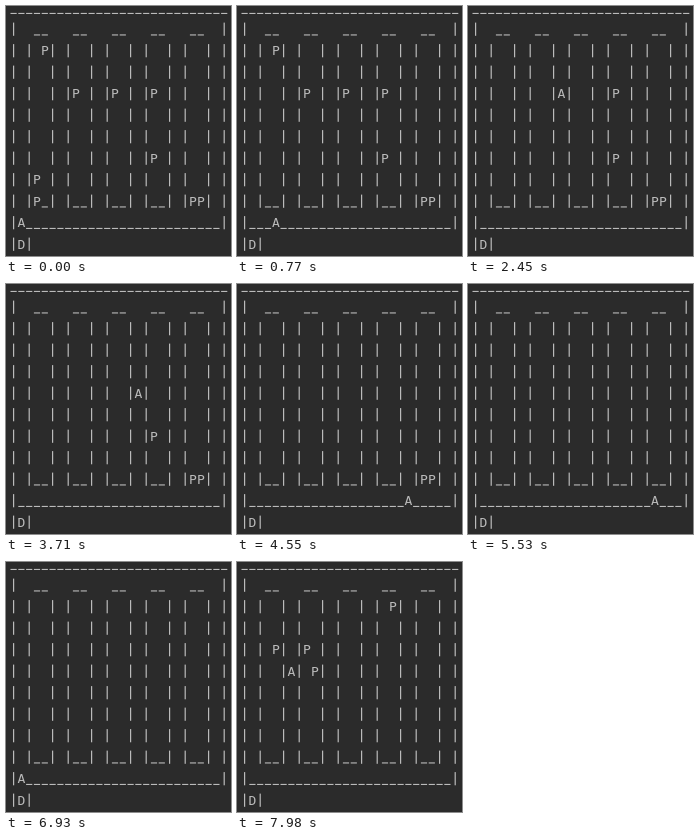
Write an HTML page with a canvas that moves like this. It is 225 by 250 pixels and loops after 8000 ms.

```html
<!DOCTYPE html>
<html lang="en">
<head>
<meta charset="utf-8">
<title>Warehouse picker</title>
<style>
  html, body { margin: 0; width: 100%; height: 100%; overflow: hidden; background: #2b2b2b; }
  canvas { display: block; width: 225px; height: 250px; }
</style>
</head>
<body>
<canvas id="stage"></canvas>
<script>
const LOOP = 8000, TICK = 70, SLACK = 5;
const REFRESH = 1.625;          // ticks between screen updates
const STEPS = 1.1 * REFRESH;    // route steps per screen update
const COL = 7.8, ROW = 21.5, LEFT = 7.6, BASE = 6.4;
const INK = '#bbbbbb', PAPER = '#2b2b2b';

// Warehouse floor: five racks between six aisles
const aisle = '| ' + '|  | '.repeat(5) + '|';
const floor = [
  '_'.repeat(28),
  '|  ' + '__   '.repeat(4) + '__  |',
  ...Array(7).fill(aisle),
  '| ' + '|__| '.repeat(5) + '|',
  '|' + '_'.repeat(26) + '|',
  '|D|'
];

// Parcels as [column, row]
const firstOrder = [[4, 2], [8, 4], [13, 4], [18, 4], [18, 7], [3, 8], [3, 9], [23, 9], [24, 9]];
const nextOrder = [[19, 2], [4, 4], [8, 4], [9, 5], [8, 7]];

// U, D, L, R move; . waits; * picks beside the aisle, then waits; N brings a new order
const route = (
  'U*U*DDRRRRRUUU UUU*UU* U.RRR.RR ' +
  'DDD* UUU.RR.RRR.D D.D*.D. DD*DDDRRR ' +
  'RRU*DRRRRRU*D' + 'L'.repeat(25) +
  '..N .RRRRRU UU.*UU'
).replaceAll(' ', '').replaceAll('*', '*.');
const dirs = { U: [0, -1], D: [0, 1], L: [-1, 0], R: [1, 0] };

const states = [{ x: 1, y: 10, parcels: firstOrder }];
for (const move of route) {
  let { x, y, parcels } = states.at(-1);
  const [dx, dy] = dirs[move] || [0, 0];
  if (move === '*') parcels = parcels.filter(([px, py]) => py !== y || Math.abs(px - x) !== 2);
  if (move === 'N') parcels = nextOrder;
  states.push({ x: x + dx, y: y + dy, parcels });
}

function stateAt(ms) {
  const tick = Math.floor(ms % LOOP / TICK);
  const update = Math.ceil((tick - 0.2) / REFRESH) - 1;
  const step = Math.floor(update * STEPS + 0.87);
  return states[Math.min(Math.max(step, 0), states.length - 1)];
}

const canvas = document.getElementById('stage');
const ctx = canvas.getContext('2d');
const ratio = window.devicePixelRatio || 1;
canvas.width = 225 * ratio;
canvas.height = 250 * ratio;
ctx.scale(ratio, ratio);
ctx.font = '13px "DejaVu Sans Mono", "Noto Sans Mono", monospace';
ctx.textAlign = 'center';

function drawChar(ch, col, row) {
  const x = LEFT + col * COL, y = BASE + row * ROW;
  if (ch === '|') ctx.fillRect(x - 0.6, y - 11.3, 1.2, 13.2);
  else if (ch === '_') ctx.fillRect(x - 3.1, y + 0.5, 6.2, 1.1);
  else if (ch !== ' ') ctx.fillText(ch, x, y);
}

function draw({ x, y, parcels }) {
  const grid = floor.map(line => [...line]);
  for (const [px, py] of parcels) grid[py][px] = 'P';
  grid[y][x] = 'A';
  ctx.fillStyle = PAPER;
  ctx.fillRect(0, 0, 225, 250);
  ctx.fillStyle = INK;
  grid.forEach((line, row) => line.forEach((ch, col) => drawChar(ch, col, row)));
}

function frame() {
  draw(stateAt(performance.now() + SLACK));
  requestAnimationFrame(frame);
}
frame();
</script>
</body>
</html>
```
